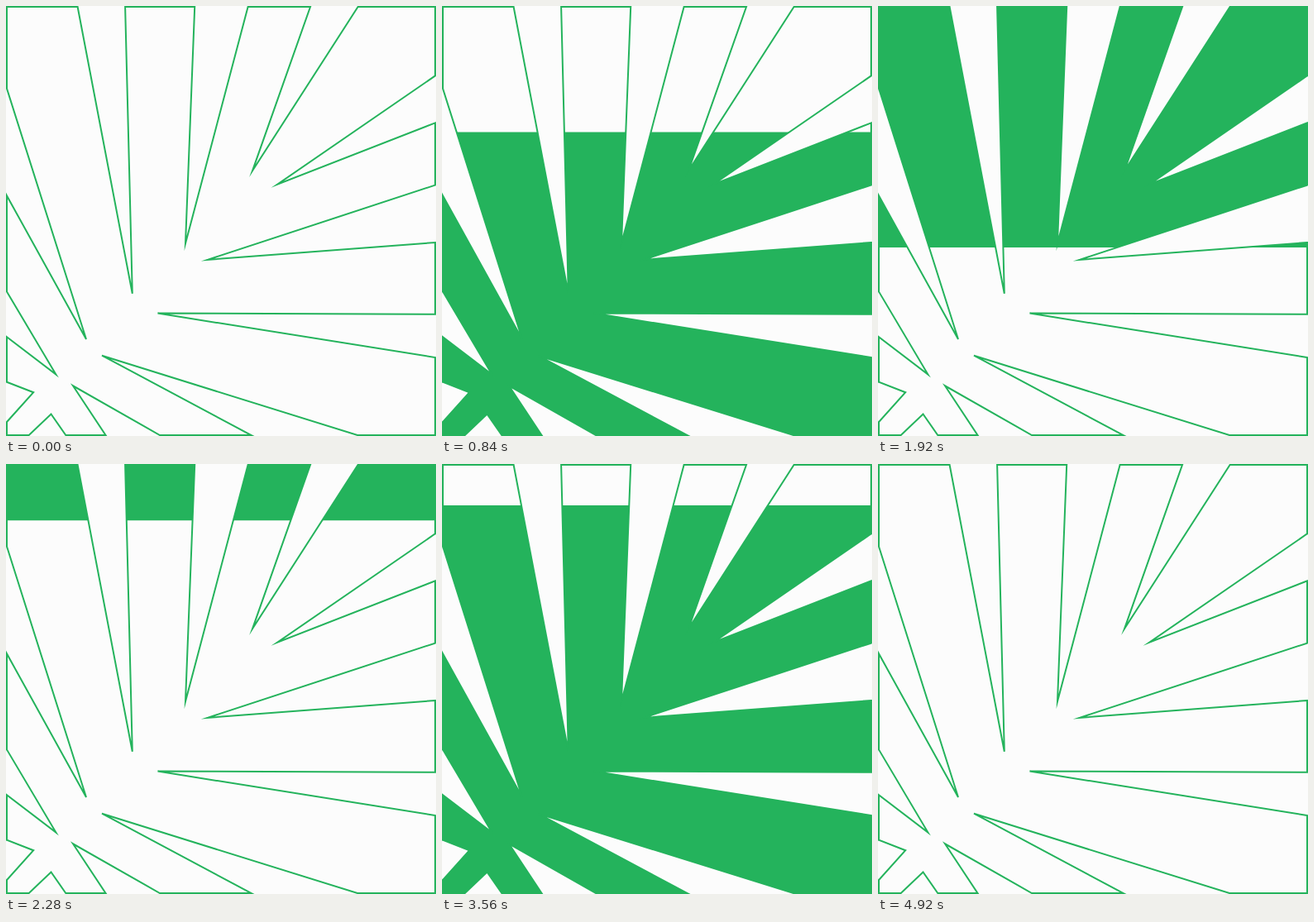
These frames come from a looping animation (520 px wide and 520 px high, 5 s). An HTML page:

```html
<!DOCTYPE html>
<html lang="en">
<head>
<meta charset="utf-8">
<title>Leaf fill</title>
<style>
  html, body { margin: 0; width: 100%; height: 100%; overflow: hidden; background: #fcfcfc; }
  svg { display: block; width: 100%; height: 100%; }
</style>
</head>
<body>
<svg viewBox="0 0 520 520">
  <defs>
    <clipPath id="band"><rect id="window" width="520" height="0"/></clipPath>
    <path id="leaf" d="M1 1H86.6L152.8 347.8 144.1 1H228.2L217 287.3 292.6 1H368L298 199.3 425.6 1H519
      V84.4L328.2 215.7 519 141.4V216.6L244 306.8 519 286V372.7L183.5 371.6 519 425V519
      H425L116 422.7 296.5 519H186L81 459.3 120.5 519H72.3L54.5 493.5 27.7 519H1
      V503L33.2 467.2 1 454.7V400.3L60.4 445.5 1 345.4V229.4L97 403 1 99.8Z"/>
  </defs>
  <use href="#leaf" fill="#24b35c" clip-path="url(#band)"/>
  <use href="#leaf" fill="none" stroke="#24b35c" stroke-width="2" stroke-miterlimit="10"/>
</svg>
<script>
  const LOOP = 5000, CYCLE = 2512, TURN = 1455, SIZE = 520;
  const pane = document.getElementById('window');

  // Height of the moving edge as [ms, y] knots: first filling, then draining.
  const rise = curve([[75, 518], [370, 428], [640, 273.5], [840, 153], [1047, 51], [1168, 3.5], [1185, 0]]);
  const drain = curve([[1460, 518], [1520, 515], [1928, 288], [2040, 222.5], [2280, 69], [2390, 0]]);

  // Monotone cubic through the knots, held flat outside them.
  function curve(pts) {
    const last = pts.length - 1;
    const slope = i => (pts[i + 1][1] - pts[i][1]) / (pts[i + 1][0] - pts[i][0]);
    const tangent = pts.map((p, i) => {
      if (i === 0) return 0;
      if (i === last) return slope(i - 1);
      const a = slope(i - 1), b = slope(i);
      return 2 * a * b / (a + b);
    });
    return t => {
      if (t <= pts[0][0]) return pts[0][1];
      if (t >= pts[last][0]) return pts[last][1];
      const i = pts.findIndex(p => p[0] > t) - 1;
      const [t0, y0] = pts[i], [t1, y1] = pts[i + 1];
      const h = t1 - t0, s = (t - t0) / h, r = 1 - s;
      return y0 * r * r * (1 + 2 * s) + y1 * s * s * (3 - 2 * s)
        + h * s * r * (tangent[i] * r - tangent[i + 1] * s);
    };
  }

  function draw(time) {
    const t = (time % LOOP) % CYCLE;
    const filling = t < TURN;
    const edge = filling ? rise(t) : drain(t);
    // Nothing is filled before the rise begins.
    const top = !filling ? 0 : edge >= 518 ? SIZE : edge;
    const bottom = filling ? SIZE : edge >= 518 ? SIZE : edge;
    pane.setAttribute('y', top);
    pane.setAttribute('height', bottom - top);
  }

  function tick() {
    draw(performance.now());
    requestAnimationFrame(tick);
  }
  tick();
</script>
</body>
</html>
```
